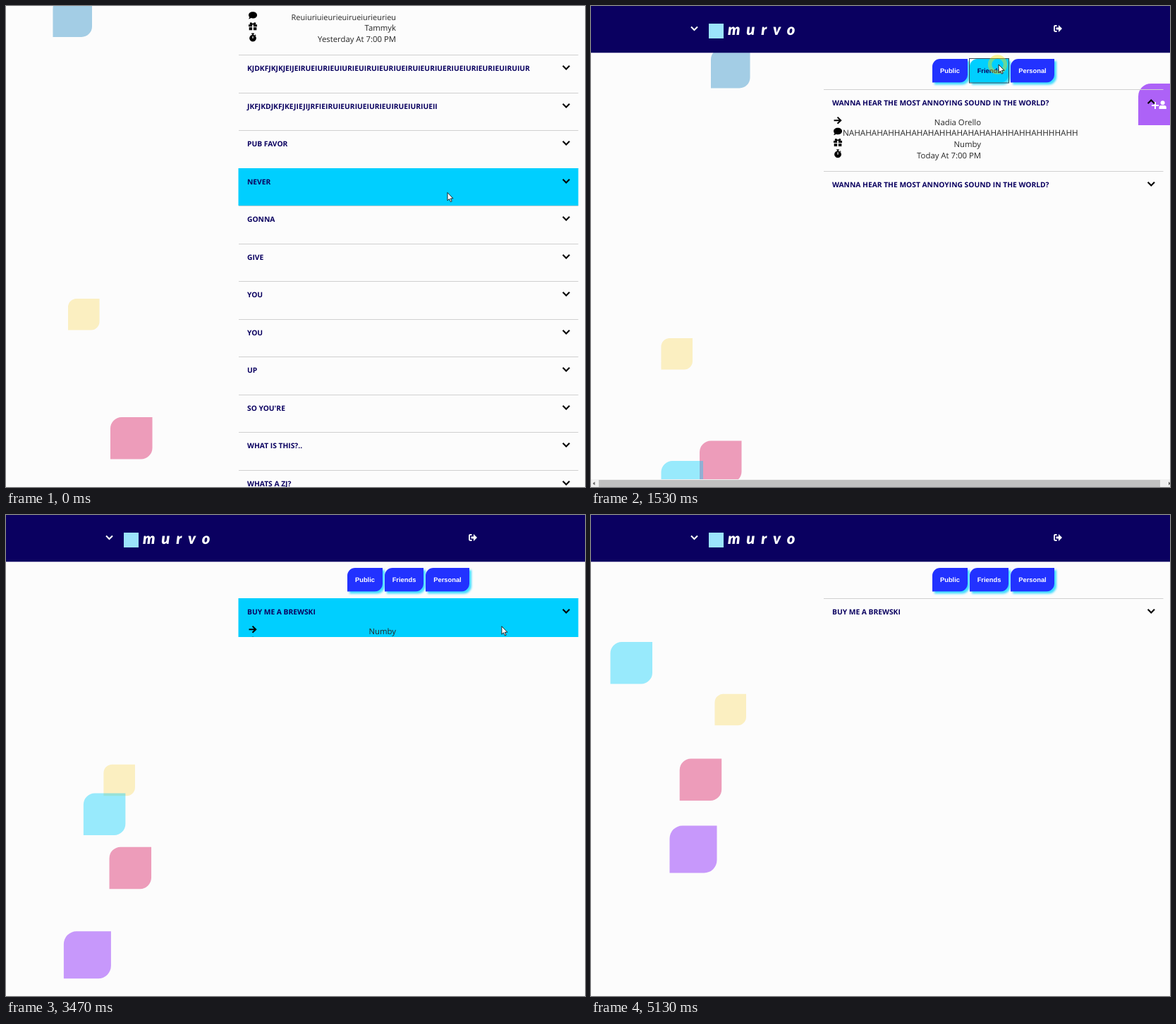
Recreate the animation shown at these times as an HTML page. Size 821 by 682 pixels, loop 5.19 s.

```html
<!DOCTYPE html>
<html lang="en">
<head>
<meta charset="utf-8">
<title>Favor list</title>
<style>
  html, body { margin: 0; width: 100%; height: 100%; overflow: hidden; background: #fcfcfc; }
  #stage { display: block; width: 821px; height: 682px; }
  text { text-rendering: geometricPrecision; white-space: pre; }
  .title { font: bold 10.28px "Open Sans", "Noto Sans", sans-serif; fill: #0a0060; }
  .detail { font-family: "Open Sans", "Noto Sans", sans-serif; fill: #262626; }
  .tab { font: bold 9.33px "Liberation Sans", Arial, sans-serif; text-anchor: middle; }
  .brand { font: italic 900 22px Lato, sans-serif; letter-spacing: 8.8px; fill: #fff; }
</style>
</head>
<body>
<svg id="stage" viewBox="0 0 821 682">
  <defs>
    <filter id="glow" x="-20%" y="-20%" width="150%" height="160%">
      <feDropShadow dx="3" dy="3" stdDeviation="1.5" flood-color="#00cfff" flood-opacity=".75"/>
    </filter>
  </defs>
  <rect width="821" height="682" fill="#fcfcfc"/>
  <g id="page"></g>
  <g id="scrollbar">
    <rect y="671" width="821" height="11" fill="#f1f1f1"/>
    <rect x="11" y="672" width="796" height="10" fill="#c1c1c1"/>
    <path d="M5.5 674.5v5l-3-2.5zM819 674.5v5l3-2.5z" fill="#606060"/>
  </g>
  <circle id="ripple" fill="none" stroke="#ffe600"/>
  <path id="cursor" d="M0 0V11.4L2.6 9 4.4 13.2 6.2 12.4 4.4 8.4H8z" fill="#fff" stroke="#111" stroke-width=".9"/>
</svg>
<script>
const LOOP = 5190, STEP = 200 / 3;
const NAVY = '#0a0060', CYAN = '#00cfff', BLUE = '#2230ff';
const ROW_TOP = 118, ROW_H = 53.5, LINE_H = 15.65;
const FRIENDS_AT = 1400, PERSONAL_AT = 2060, COLLAPSE_AT = 3270;
const SCROLL_START = 422, SCROLL_END = 880;

const byId = id => document.getElementById(id);
const clamp = v => Math.max(0, Math.min(1, v));
const smooth = u => u * u * (3 - 2 * u);
const show = (node, on) => node.setAttribute('display', on ? 'inline' : 'none');

function set(node, attrs) {
  for (const key in attrs) node.setAttribute(key, attrs[key]);
  return node;
}
function add(parent, tag, attrs, text) {
  const node = set(document.createElementNS('http://www.w3.org/2000/svg', tag), attrs || {});
  if (text) node.textContent = text;
  return parent.appendChild(node);
}

// Rounded at top left and bottom right only
const leaf = (w, h, r) =>
  `M0 ${h}V${r}A${r} ${r} 0 0 1 ${r} 0H${w}V${h - r}A${r} ${r} 0 0 1 ${w - r} ${h}Z`;

function segmentAt(times, t) {
  let i = 0;
  while (i < times.length - 2 && t > times[i + 1]) i++;
  const span = times[i + 1] - times[i];
  return { i, span, u: clamp((t - times[i]) / span) };
}

// Smooth curve through points at uneven times
function spline(times, points, t) {
  const last = times.length - 1;
  const { i, span, u } = segmentAt(times, t);
  return [0, 1].map(axis => {
    const slope = k => {
      const a = Math.max(0, k - 1), b = Math.min(last, k + 1);
      return (points[b][axis] - points[a][axis]) / (times[b] - times[a]) * span;
    };
    const p = points[i][axis], q = points[i + 1][axis];
    return p + (q - p) * smooth(u) + slope(i) * u * (1 - u) ** 2 - slope(i + 1) * u * u * (1 - u);
  });
}

// Eases from stop to stop without overshoot
function glide(times, points, t) {
  const { i, u } = segmentAt(times, t);
  return points[i].map((p, axis) => p + (points[i + 1][axis] - p) * smooth(u));
}

const ICONS = {
  arrow: { d: 'M-5.5 0H4M-.5-4.6 4.2 0-.5 4.6', fill: 'none', stroke: '#000', 'stroke-width': 2 },
  chat: { d: 'M0-5C3.5-5 6-2.9 6-.3S3.5 4.4 0 4.4C-1 4.4-2 4.2-2.8 3.9-3.7 4.7-4.8 5.2-6 5.2-5.3 4.4-4.8 3.4-4.7 2.6-5.5 1.8-6 .8-6-.3-6-2.9-3.5-5 0-5Z' },
  gift: { d: 'M-6-2.6H-.9V.4H-6ZM.9-2.6H6V.4H.9ZM-5.3 1.4H-.9V5.4H-5.3ZM.9 1.4H5.3V5.4H.9ZM-.3-2.4H-2.6A1.6 1.6 0 1 1-1.5-5Q-.8-4.8 0-3.6 .8-4.8 1.5-5A1.6 1.6 0 1 1 2.6-2.4Z' },
  timer: { d: 'M-1.8-6H1.8V-4.6H.8V-3.7A4.9 4.9 0 1 1-.8-3.7V-4.6H-1.8ZM-.6-1.8V1.6H.6V-1.8ZM3.4-4 4.6-2.8 3.9-2.1 2.7-3.3Z', 'fill-rule': 'evenodd' }
};

const row = (title, ...details) => ({ title, details });
const annoying = 'WANNA HEAR THE MOST ANNOYING SOUND IN THE WORLD?';
const LISTS = {
  Public: [
    row('JKRJIEUITUEIUTIEUITUEIUTIEUTIEUTIUEUTIEUTIUEITUIEUTIUEITUIEUTIE',
      ['chat', 'Reuiuriuieurieuirueiurieurieu', 10.95], ['gift', 'Tammyk'], ['timer', 'Yesterday At 7:00 PM']),
    ...['KJDKFJKJKJEIJEIRUEIURIEUIURIEUIRUIEURIUEIRUIEURIUERIUEIURIEURIEUIRUIUR',
      'JKFJKDJKFJKEJIEJIJRFIEIRUIEURIUEIURIEUIRUEIURIUEII', 'PUB FAVOR', 'NEVER', 'GONNA', 'GIVE',
      'YOU', 'YOU', 'UP', "SO YOU'RE", 'WHAT IS THIS?..', 'WHATS A ZJ?'].map(title => row(title))
  ],
  Friends: [
    row(annoying, ['arrow', 'Nadia Orello'], ['chat', 'NAHAHAHAHHAHAHAHAHHAHAHAHAHAHHAHHAHHHHAHH', 11.68],
      ['gift', 'Numby'], ['timer', 'Today At 7:00 PM']),
    row(annoying)
  ],
  Personal: [
    row('BUY ME A BREWSKI', ['arrow', 'Numby'], ['chat', 'Hold My Beer'],
      ['gift', 'Nadia Orello'], ['timer', 'Today At 7:00 PM'])
  ]
};

const page = byId('page');

// Drifting leaves, in page coordinates
const DRIFT_TIMES = [0, 600, 1533, 2267, 2867, 3933, 5133];
const leaves = [
  { size: 55.5, color: '#1d84c0', path: [[66.5, 137.5], [112, 107], [170, 61], [143.5, 20.5], [110, -12], [80, -75], [60, -140]] },
  { size: 44.5, color: '#f7d966', path: [[88, 564], [90, 527], [99.5, 471], [113, 422.5], [124.3, 390], [149.5, 325.3], [175.5, 253.8]] },
  { size: 59.5, color: '#d40a55', path: [[148, 732], [151.8, 686.5], [154, 616.5], [153.2, 556.5], [151, 515.5], [142, 435.3], [125.7, 345.5]] },
  { size: 59.5, color: '#00ccfb', path: [[20, 880], [55, 790], [99.5, 645], [129.3, 541], [130.2, 471.8], [89.3, 333.5], [27.5, 180]] },
  { size: 67, color: '#7500f7', path: [[10, 960], [20, 880], [32, 785], [46, 704], [64, 645.5], [93.8, 548], [111.5, 440.5]] }
];
for (const item of leaves)
  item.node = add(page, 'path', { d: leaf(item.size, item.size, item.size * .27), fill: item.color, 'fill-opacity': .4 });

// Add-friend button
const addFriend = add(page, 'g', { transform: 'translate(776 110)' });
add(addFriend, 'path', { d: leaf(80, 59, 18), fill: '#ad62f7' });
add(addFriend, 'path', { d: 'M19 31h10M24 26v10', stroke: '#fff', 'stroke-width': 2 });
add(addFriend, 'path', { d: 'M29.5 36V34Q29.5 31 32 31H37Q39.8 31 39.8 34V36Z', fill: '#fff' });
add(addFriend, 'circle', { cx: 34.6, cy: 27.2, r: 3, fill: '#fff' });

// Header
add(page, 'rect', { width: 821, height: 66.3, fill: NAVY });
add(page, 'path', { d: 'M142 29.5l4.5 4.5 4.5-4.5', fill: 'none', stroke: '#fff', 'stroke-width': 2 });
add(page, 'rect', { x: 167, y: 25, width: 21, height: 21, fill: '#9be4fb' });
add(page, 'text', { x: 194, y: 41, class: 'brand' }, 'murvo');
add(page, 'path', { d: 'M660.5 28H658.2Q657 28 657 29.2V34.8Q657 36 658.2 36H660.5', fill: 'none', stroke: '#fff', 'stroke-width': 1.8 });
add(page, 'path', { d: 'M659.5 30.4H663V27L668 32 663 37V33.6H659.5Z', fill: '#fff' });

// Tab buttons
const tabs = [['Public', 484, 50], ['Friends', 537, 55], ['Personal', 595, 62]].map(([name, x, width]) => {
  const group = add(page, 'g', { transform: `translate(${x} 75)` });
  return {
    x, width,
    body: add(group, 'path', { d: leaf(width, 33.5, 11), filter: 'url(#glow)' }),
    label: add(group, 'text', { x: width / 2, y: 20, class: 'tab' }, name),
    outline: add(group, 'rect', { x: -.5, y: -.5, width: width + 1, height: 34.5, fill: 'none', stroke: '#3a4a55' })
  };
});

function buildRow(parent, data) {
  const group = add(parent, 'g');
  add(group, 'path', { d: 'M330 .5H811.5', stroke: '#d0d0d0' });
  const fill = add(group, 'rect', { x: 329.5, width: 482, fill: CYAN });
  add(group, 'text', { x: 342, y: 23, class: 'title' }, data.title);
  const chevron = add(group, 'path', { d: 'M-4.7-2.3 0 2.4 4.7-2.3', fill: 'none', stroke: '#000', 'stroke-width': 2.1 });
  // A nested svg clips the details while the row closes
  const details = add(group, 'svg', { width: 821 });
  data.details.forEach(([icon, text, size = 11.35], i) => {
    const y = 44.2 + LINE_H * i;
    add(details, 'path', { ...ICONS[icon], transform: `translate(350 ${y})` });
    const long = text.length > 35;
    add(details, 'text', {
      x: long ? 357 : 553, y: y + 6.5, class: 'detail', 'font-size': size, 'text-anchor': long ? 'start' : 'end'
    }, text);
  });
  return { group, fill, chevron, details, lines: data.details.length };
}
const lists = {};
for (const name in LISTS) {
  const group = add(page, 'g');
  lists[name] = { group, rows: LISTS[name].map(data => buildRow(group, data)) };
}

function layoutList(list, open, isHovered) {
  let y = ROW_TOP;
  list.rows.forEach((item, i) => {
    const expanded = item.lines ? open : 0;
    const next = y + ROW_H + item.lines * LINE_H * expanded;
    const top = Math.round(y), height = Math.round(next) - top;
    set(item.group, { transform: `translate(0 ${top})` });
    set(item.fill, { height });
    show(item.fill, isHovered(i, top, height));
    set(item.chevron, { transform: `translate(794.3 18) scale(1 ${expanded > .5 ? -1 : 1})` });
    set(item.details, { height });
    show(item.details, expanded > 0);
    y = next;
  });
}

const CURSOR_TIMES = [0, 950, 1320, 1700, 1900, 2050, 2267, 2867, 3270, 3560, 3860];
const CURSOR_PATH = [[626, 264.5], [626, 264.5], [578, 83], [578, 83], [618, 90], [621, 92],
  [640, 140], [644, 150], [650, 151], [720, 160], [840, 190]];
const CLICKS = [1350, 1990, 2840];

function render(t) {
  const scrolled = smooth(clamp((t - SCROLL_START) / (SCROLL_END - SCROLL_START)));
  const scroll = Math.round(149 * (1 - scrolled));
  const current = t < FRIENDS_AT ? 'Public' : t < PERSONAL_AT ? 'Friends' : 'Personal';
  const onFriends = current === 'Friends';
  const [cx, cy] = glide(CURSOR_TIMES, CURSOR_PATH, t);

  set(page, { transform: `translate(0 ${-scroll})` });
  for (const item of leaves)
    set(item.node, { transform: `translate(${spline(DRIFT_TIMES, item.path, t)})` });

  // The hovered row stays lit while the page scrolls under the pointer
  const isHovered = (i, y, height) => t < SCROLL_END
    ? i === 4
    : cx > 330 && cx < 811 && cy >= y && cy < y + height;
  const open = 1 - clamp((t - COLLAPSE_AT) / 200);
  for (const name in lists) show(lists[name].group, name === current);
  layoutList(lists[current], open, isHovered);

  for (const tab of tabs) {
    const over = t > SCROLL_END && cx >= tab.x && cx < tab.x + tab.width && cy >= 75 && cy < 109;
    set(tab.body, { fill: over ? CYAN : BLUE });
    set(tab.label, { fill: over ? NAVY : '#fff' });
    show(tab.outline, over);
  }
  show(addFriend, onFriends);
  show(byId('scrollbar'), onFriends);

  const click = CLICKS.find(start => t >= start && t < start + 330);
  show(byId('ripple'), click !== undefined);
  if (click !== undefined) {
    const age = t - click, outer = 6 + age * .042, inner = Math.max(0, age - 80) * .08;
    set(byId('ripple'), {
      cx: cx - 1.5, cy, r: (outer + inner) / 2, 'stroke-width': outer - inner,
      'stroke-opacity': .72 * (1 - age / 420)
    });
  }
  set(byId('cursor'), { transform: `translate(${cx} ${cy})` });
}

const startTime = performance.now();
function tick() {
  const t = (performance.now() - startTime) % LOOP;
  render(Math.floor((t + 4) / STEP) * STEP);
  requestAnimationFrame(tick);
}
tick();
</script>
</body>
</html>
```
